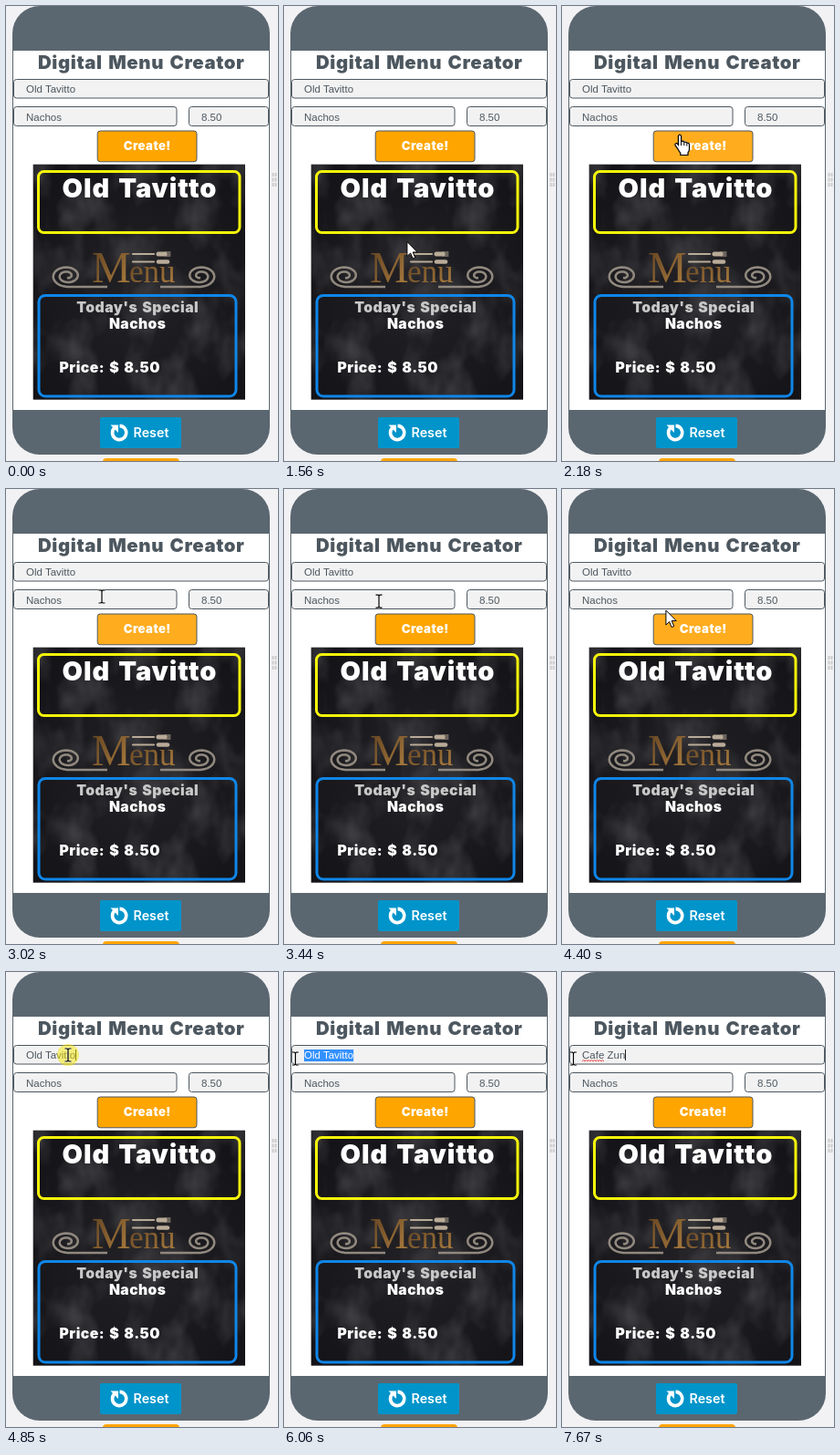
Recreate the animation shown at these times as an HTML page. Size 298 px wide and 499 px high, loop 8000 ms.

```html
<!DOCTYPE html>
<html lang="en">
<head>
<meta charset="utf-8">
<title>Digital Menu Creator</title>
<style>
  html, body { margin: 0; width: 100%; height: 100%; overflow: hidden; background: #f2f2f4; }
  svg { display: block; }
  text { white-space: pre; }
  .heavy { font-family: Inter, "Liberation Sans", sans-serif; font-weight: 900; word-spacing: .09em; letter-spacing: .03em; fill: #fff; }
  .mid { text-anchor: middle; }
  .field { fill: #f2f2f2; stroke: #4d575f; }
  .input { font: 11.5px "Liberation Sans", Arial, sans-serif; fill: #4d575f; }
  .art { font-family: "Liberation Serif", serif; fill: url(#gold); }
</style>
</head>
<body>
<svg width="298" height="499" viewBox="0 0 298 499">
  <defs>
    <radialGradient id="slate" cy=".55" r=".7">
      <stop offset="0" stop-color="#222125"/><stop offset="1" stop-color="#131216"/>
    </radialGradient>
    <linearGradient id="gold" x2="1" y2="1">
      <stop offset="0" stop-color="#5e4020"/><stop offset="1" stop-color="#b08040"/>
    </linearGradient>
    <!-- chalk dust: soft grey noise -->
    <filter id="dust" x="0" y="0" width="1" height="1">
      <feTurbulence type="fractalNoise" baseFrequency=".03 .02" numOctaves="3" seed="4"/>
      <feColorMatrix values="0 0 0 0 .6  0 0 0 0 .6  0 0 0 0 .62  .9 0 0 0 -.38"/>
    </filter>
  </defs>

  <!-- phone -->
  <rect x="7" y="0" width="282" height="492" rx="30" fill="#5b6770"/>
  <rect x="8" y="49" width="280" height="394" fill="#fff"/>
  <g id="grip" fill="#ccc"></g>
  <rect x="106" y="496" width="84" height="20" rx="4" fill="#ffa400"/>
  <rect x="103" y="451" width="89" height="34" rx="2" fill="#0094ca"/>
  <path d="M118.6 462.8A7.6 7.6 0 1 0 124.5 460.4" fill="none" stroke="#fff" stroke-width="3.6"/>
  <path d="M114.5 459.5h8.5v8.5z" fill="#fff"/>
  <text x="139.5" y="473" font-family="Inter, sans-serif" font-weight="600" font-size="14.3" fill="#fff">Reset</text>

  <!-- form -->
  <text class="heavy mid" x="148.3" y="69" font-size="20.4" style="fill:#4d575f">Digital Menu Creator</text>
  <rect class="field" x="8.5" y="80.5" width="279" height="20.5" rx="3"/>
  <rect class="field" x="8.5" y="110.5" width="178.5" height="21" rx="3"/>
  <rect class="field" x="200.5" y="110.5" width="87" height="21" rx="3"/>
  <rect id="mark" y="85" height="13" fill="#3390ff"/>
  <text id="name" class="input" x="22" y="95"><tspan></tspan><tspan fill="#fff"></tspan></text>
  <path id="wave" fill="none" stroke="#e33" stroke-width=".9"/>
  <rect id="caret" y="85" width="1" height="12" fill="#222"/>
  <text class="input" x="22" y="126">Nachos</text>
  <text class="input" x="214" y="126">8.50</text>
  <rect id="button" x="100.2" y="137" width="108.8" height="33.8" rx="3" stroke="#4d575f"/>
  <text class="heavy mid" x="154.7" y="158" font-size="13.2">Create!</text>

  <!-- menu board -->
  <rect x="29.7" y="173.7" width="232.3" height="258" fill="url(#slate)"/>
  <rect x="30" y="174" width="232" height="258" filter="url(#dust)" opacity=".5"/>
  <path id="scrolls" fill="none" stroke="#91897f" stroke-width="2.5"/>
  <text class="art" x="94" y="303" font-size="48">M</text>
  <text class="art" x="135" y="303" font-size="35">enu</text>
  <g fill="none" stroke="#b9ab98" stroke-linecap="round">
    <path d="M139 272h23" stroke-width="2.2"/>
    <path d="M167 272h7" stroke-width="5"/>
    <path d="M174 270h6M174 272h6M174 274h6" stroke-width="1"/>
    <path d="M139 280.5h23" stroke-width="2.2"/>
    <path d="M167 280.5h10" stroke-width="4.6"/>
  </g>
  <rect x="35.5" y="181.5" width="220.5" height="67" rx="6" fill="none" stroke="#f6f60a" stroke-width="3"/>
  <rect x="36" y="317.5" width="216" height="110.5" rx="7" fill="none" stroke="#0f86e8" stroke-width="3"/>
  <text class="heavy mid" x="146.4" y="210" font-size="29">Old Tavitto</text>
  <text class="heavy mid" x="144.2" y="336" font-size="15.8" style="fill:#c8c8c8">Today's Special</text>
  <text class="heavy mid" x="144.2" y="354" font-size="15.6">Nachos</text>
  <text class="heavy" x="58.5" y="402" font-size="15.8">Price: $ 8.50</text>

  <!-- pointer -->
  <g id="pointer">
    <circle id="press" r="12" fill="#f5e800" opacity=".5"/>
    <path id="arrow" d="M0 0v16l3.7-3.5 2.5 6 2.6-1.1-2.5-5.9h5z" fill="#fff" stroke="#000"/>
    <g id="hand">
      <path d="M-1.6 1.5q1.6-2.6 3.2 0v6.2q1.9-1.2 3.2.6 2-.8 3 .9 2.6-.4 2.7 2.3v4.5q0 2-1.5 3.8v2.7h-8.2v-2.2q-1.6-2-3.2-5l-2.6-3.6q-.4-2.6 2-2l1.4 1.6z" fill="#fff" stroke="#000" stroke-width="1.2"/>
      <path d="M1.6 8v4M4.8 8.6v3.6M7.8 9.6v3" stroke="#000"/>
    </g>
    <g id="beam" fill="none">
      <path d="M-3.5-7h2.5l1 1 1-1h2.5M0-6v12M-3.5 7h2.5l1-1 1 1h2.5" stroke="#fff" stroke-width="2.6" opacity=".6"/>
      <path d="M-3.5-7h2.5l1 1 1-1h2.5M0-6v12M-3.5 7h2.5l1-1 1 1h2.5" stroke="#000" stroke-width="1.2"/>
    </g>
  </g>
</svg>
<script>
const $ = id => document.getElementById(id);
const set = (id, attrs) => { for (const k in attrs) $(id).setAttribute(k, attrs[k]); };
const show = (id, on) => { $(id).style.display = on ? '' : 'none'; };

const LOOP = 8000, LEFT = 22;
const OLD = 'Old Tavitto', NEW = 'Cafe Zun';
const keyTimes = [6590, 6720, 6870, 6940, 7250, 7360, 7470, 7670];
// pointer path: time, x, y
const path = [
  [1200, 135, 342], [1300, 135, 259], [1560, 135, 259], [1760, 114, 156], [1900, 90, 126],
  [2030, 115, 139], [2180, 129, 141], [2250, 129, 141], [2320, 136, 145], [2390, 136, 145],
  [2470, 138, 148], [2670, 138, 148], [2910, 123, 139], [3020, 105, 118], [3130, 105, 118],
  [3280, 102, 110], [3440, 104, 123], [3510, 104, 128], [3650, 118, 142], [3790, 129, 153],
  [4250, 129, 153], [4500, 104, 120], [4720, 80, 92], [4850, 68, 91], [4950, 68, 91],
  [5130, 12.5, 95]
];

function place(t) {
  let i = path.findIndex(p => p[0] > t);
  if (i < 0) i = path.length;
  const a = path[Math.max(i - 1, 0)], b = path[i] || a;
  const f = b === a ? 0 : Math.max(0, (t - a[0]) / (b[0] - a[0]));
  return [a[1] + (b[1] - a[1]) * f, a[2] + (b[2] - a[2]) * f];
}
const within = ([x, y], l, t, r, b) => x >= l && x <= r && y >= t && y <= b;
const onButton = p => within(p, 100, 137, 209, 171);
const onField = p => within(p, 8, 80, 288, 101) || within(p, 8, 110, 187, 132);

function scroll(cx, dir) {
  let d = '';
  for (let k = 0; k <= 1.001; k += .02) {
    const a = Math.PI * (.5 + 4 * (1 - k)), r = 3 + 14 * k;
    d += `${d ? 'L' : 'M'}${cx + dir * r * Math.cos(a)} ${296 + .7 * r * Math.sin(a)}`;
  }
  return d + `h${dir * 44}`;
}
set('scrolls', { d: scroll(67, 1) + scroll(213, -1) });
for (const x of [291.5, 294.5]) for (const y of [183, 188.5, 194])
  $('grip').innerHTML += `<rect x="${x}" y="${y}" width="2" height="4"/>`;

function drawField(t, x) {
  const typed = keyTimes.filter(k => k <= t).length;
  const value = typed ? NEW.slice(0, typed) : OLD;
  const name = $('name'), [plain, picked] = name.children;
  plain.textContent = value;
  picked.textContent = '';
  const width = n => n ? name.getSubStringLength(0, n) : 0;
  const full = width(value.length);

  let from = value.length;
  if (!typed && t >= 4950)
    while (from && LEFT + (width(from) + width(from - 1)) / 2 > x) from--;
  const start = width(from);
  plain.textContent = value.slice(0, from);
  picked.textContent = value.slice(from);
  set('mark', { x: LEFT + start, width: full - start });

  show('caret', t >= 4780 && from === value.length);
  set('caret', { x: Math.round(LEFT + full) });

  let d = '';
  if (typed > 4) {
    const end = LEFT + width(4);
    d = `M${LEFT} 98`;
    for (let i = 1; LEFT + i * 1.5 < end; i++) d += `L${LEFT + i * 1.5} ${i % 2 ? 96.6 : 98}`;
  }
  set('wave', { d });
}

function frame(now) {
  const t = now % LOOP, p = place(t);
  drawField(t, p[0]);
  set('button', { fill: t > 1310 && onButton(place(t - 110)) ? '#ffad1f' : '#ffa500' });

  const hand = onButton(p), beam = onField(p);
  show('pointer', t >= 1200);
  set('pointer', { transform: `translate(${p[0]} ${p[1]})` });
  show('hand', hand);
  show('beam', beam);
  show('arrow', !hand && !beam);
  show('press', t >= 4780 && t < 5070);
  requestAnimationFrame(frame);
}
requestAnimationFrame(frame);
</script>
</body>
</html>
```
